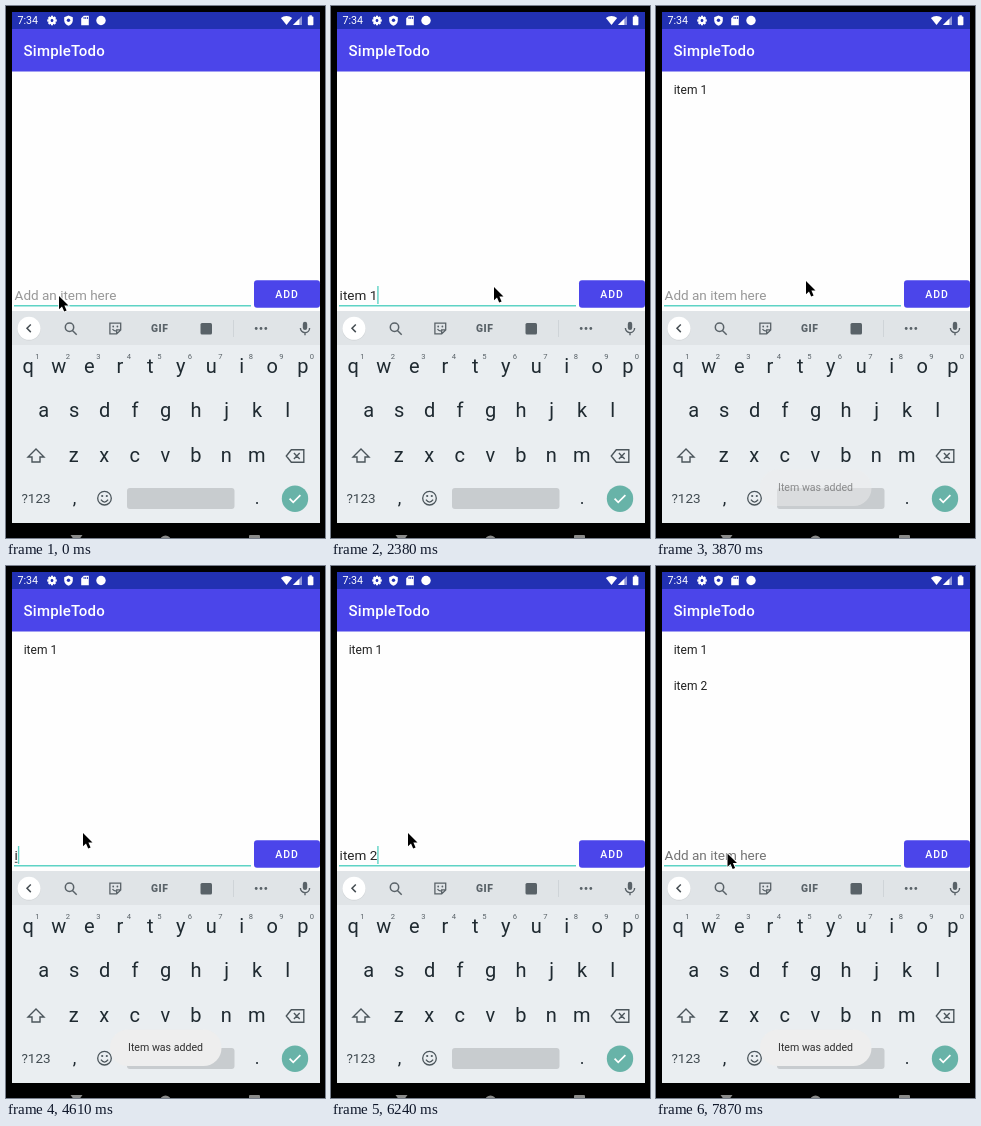
An HTML page with a canvas for the animation above (8000 ms loop, 319x532 px).

```html
<!DOCTYPE html>
<html lang="en">
<head>
<meta charset="utf-8">
<title>To-do list demo</title>
<style>
  html, body { margin: 0; width: 100%; height: 100%; overflow: hidden; background: #000; }
  canvas { display: block; width: 319px; height: 532px; }
</style>
</head>
<body>
<canvas id="stage"></canvas>
<script>
const W = 319, H = 532, LOOP = 8000, TICK = 148.5;
const cv = document.getElementById('stage');
const g = cv.getContext('2d');
const dpr = window.devicePixelRatio || 1;
cv.width = W * dpr;
cv.height = H * dpr;

const GREY = '#596268', INK = '#1f2a31', TEAL = '#5ed3c5', INDIGO = '#4b45ea';

// Drawing helpers
function rect(x, y, w, h, color, r = 0) {
  g.fillStyle = color;
  g.beginPath();
  g.roundRect(x, y, w, h, r);
  g.fill();
}
function dot(x, y, r, color) {
  g.fillStyle = color;
  g.beginPath();
  g.arc(x, y, r, 0, 7);
  g.fill();
}
function path(d, x, y, color, line = 0) {
  g.save();
  g.translate(x, y);
  const p = new Path2D(d);
  if (line) {
    g.strokeStyle = color;
    g.lineWidth = line;
    g.stroke(p);
  } else {
    g.fillStyle = color;
    g.fill(p);
  }
  g.restore();
}
function text(s, x, y, size, color, { weight = 400, align = 'left', gap = 0 } = {}) {
  g.font = `${weight} ${size}px Roboto, sans-serif`;
  g.letterSpacing = gap + 'px';
  g.textAlign = align;
  g.fillStyle = color;
  g.fillText(s, x, y);
}
// Latest value whose tick has been reached
function at(track, k) {
  let v = track[0][1];
  for (const [t, val] of track) if (k >= t) v = val;
  return v;
}
const within = (k, ...spans) => spans.some(([a, b]) => k >= a && k < b);
const clamp = v => Math.max(0, Math.min(1, v));

// Timeline, in ticks
const typed = [[0, ''], [2, 'i'], [4, 'it'], [5, 'ite'], [6, 'item'], [10, 'item '], [13, 'item 1'], [21, ''],
  [31, 'i'], [32, 'it'], [33, 'ite'], [34, 'item'], [37, 'item '], [41, 'item 2'], [48, '']];
const strip = [[0, 'tools'], [4, 'words'], [11, 'blank'], [14, 'tools'],
  [32, 'words'], [39, 'blank'], [42, 'tools']];
const mouse = [[0, [53, 290]], [16, [163, 281]], [17, [232, 287]], [18, [278, 291]], [19, [290, 292]],
  [25, [240, 286]], [26, [150, 275]], [27, [95, 268]], [28, [77, 267]],
  [44, [150, 275]], [45, [250, 288]], [46, [290, 292]], [50, [250, 290]],
  [51, [150, 288]], [52, [95, 288]], [53, [71.5, 287.5]]];

function statusBar() {
  rect(6, 6, 308, 17.5, '#2231b3');
  text('7:34', 11.5, 18.3, 10.7, '#fff');
  for (let i = 0; i < 8; i++) {
    g.save();
    g.translate(46, 14.5);
    g.rotate(i * Math.PI / 4);
    rect(-1.1, -4.8, 2.2, 3, '#fff');
    g.restore();
  }
  g.strokeStyle = '#fff';
  g.lineWidth = 2.2;
  g.beginPath();
  g.arc(46, 14.5, 2.6, 0, 7);
  g.stroke();
  path('M0-5L4.3-3.2V0C4.3 2.6 2.4 4.5 0 5.2C-2.4 4.5-4.3 2.6-4.3 0V-3.2Z', 62.5, 14.5, '#fff');
  dot(62.5, 14.3, 1.7, '#2231b3');
  path('M-1.2-4.8H3.8V4.8H-3.8V-2.2Z', 79, 14.5, '#fff');
  for (let i = 0; i < 3; i++) rect(77.6 + i * 1.7, 11, 0.9, 2, '#2231b3');
  dot(95, 14.5, 4.7, '#fff');
  path('M0 4.5L-5.6-2.4C-2.5-5.2 2.5-5.2 5.6-2.4Z', 280.5, 14.5, '#fff');
  path('M4.5-4.5V4.5H-4.5Z', 291.5, 14.5, '#8d94d8');
  path('M1.8-1.8V4.5H-4.5Z', 291.5, 14.5, '#fff');
  rect(301.8, 10.4, 5.6, 8.8, '#fff', 0.7);
  rect(303.3, 9.3, 2.6, 1.6, '#fff');
}

function entry(k) {
  const s = at(typed, k);
  rect(8, 299, 237, 1.6, TEAL);
  if (s) text(s, 8.6, 294, 13.5, '#262626');
  else text('Add an item here', 8.6, 294, 13.5, k >= 48 ? '#747474' : '#989898');
  g.font = '400 13.5px Roboto, sans-serif';
  const w = s ? g.measureText(s).width : 0;
  if (s && !s.includes(' ')) rect(8.8, 295.8, w - 0.6, 1, '#444');
  if (!within(k, [0, 2], [9, 10], [23, 24], [26, 31], [36, 37], [52, 54]))
    rect(8.6 + w, 280, 1.4, 18, TEAL);

  const pressed = within(k, [20, 23], [47, 49]);
  rect(248, 274.3, 66, 27.4, pressed ? '#6150ed' : INDIGO, 3);
  text('ADD', 269.2, 292, 10.5, '#fff', { weight: 500, gap: 0.94 });
}

function tools() {
  path('M2.2 2.2L6.2 6.2M3.2-1.2A4.2 4.2 0 1 1-5.2-1.2A4.2 4.2 0 1 1 3.2-1.2', 64.5, 322.5, GREY, 1.5);
  path('M-5.4-5.4H5.4V1.4L1.4 5.4H-5.4ZM1.4 5.4V1.4H5.4M-2.8.5Q-1.5 2.8 .6 2.2', 109.3, 322.5, GREY, 1.3);
  dot(107.2, 320.5, 0.9, GREY);
  dot(111.4, 320.5, 0.9, GREY);
  text('GIF', 145, 326.2, 10.3, GREY, { weight: 800, gap: 0.5 });
  rect(194.5, 317, 11.5, 11.5, GREY, 1.5);
  rect(227, 314, 1, 17, '#cfd4d8');
  for (let i = -1; i < 2; i++) dot(255 + i * 4.8, 322.5, 1.4, GREY);
}

function suggestions(words) {
  rect(113, 314, 1, 18, '#ccd1d5');
  rect(204, 314, 1, 18, '#ccd1d5');
  words.forEach((w, i) => text(w, 73.3 + i * 85.3, 327.5, 13.3, '#5d686f', { align: 'center' }));
}

function keyboard(k) {
  rect(6, 305, 308, 34, '#e0e4e7');
  rect(6, 339, 308, 178, '#eaeef1');
  const mode = at(strip, k);
  dot(23, 323, 11.8, '#d3d7da');
  dot(23, 322.3, 11.5, '#fff');
  path(mode === 'tools' ? 'M1.8-3.8L-2 0L1.8 3.8' : 'M-1.8-3.8L2 0L-1.8 3.8', 23, 322.3, '#454d52', 1.5);
  if (mode === 'tools') tools();
  else suggestions(mode === 'words' ? ['item', 'items', 'itemized'] : []);
  rect(296.8, 315.8, 4.4, 8.2, GREY, 2.2);
  path('M-4.6-.6A4.6 4.6 0 0 0 4.6-.6M0 4V6.6', 299, 322.6, GREY, 1.4);

  [['qwertyuiop', 22.3, 367], ['asdfghjkl', 37.6, 411.3], ['zxcvbnm', 67.8, 456]].forEach(([row, x, y]) => {
    [...row].forEach((c, i) => text(c, x + i * 30.5, y, 20, INK, { align: 'center' }));
  });
  [...'1234567890'].forEach((c, i) => text(c, 31.3 + i * 30.5, 352.5, 7.6, GREY, { align: 'center' }));

  path('M0-7L8 1H4V6H-4V1H-8Z', 30, 450, '#4b555b', 1.4);
  path('M-4-6.2H8.5V6.2H-4L-9 0ZM-1.4-2.9L4.4 2.9M4.4-2.9L-1.4 2.9', 289.3, 450, '#4b555b', 1.4);

  text('?123', 30, 497.2, 13.5, '#414b51', { align: 'center' });
  text(',', 68.5, 498, 18, INK, { align: 'center' });
  path('M6.8 0A6.8 6.8 0 1 1-6.8 0A6.8 6.8 0 1 1 6.8 0M-3.6 1.5Q0 6.2 3.6 1.5', 98.5, 492.2, '#4b555b', 1.3);
  dot(96.2, 490, 1.1, '#4b555b');
  dot(100.8, 490, 1.1, '#4b555b');
  rect(121, 482, 107.5, 21, '#c8cccf', 3);
  text('.', 251, 498, 18, INK, { align: 'center' });
  dot(289, 492.7, 13.2, '#68b3a8');
  path('M-5.4 0L-1.8 3.6L5.4-3.6', 289, 492.7, '#fff', 1.7);
}

function toast(k) {
  const a = k < 40 ? Math.min(clamp((k - 24) / 4), clamp((39 - k) / 4)) : clamp((k - 49) / 4);
  if (!a) return;
  g.globalAlpha = a;
  rect(104, 463.5, 111.5, 36.5, '#eeeeee', 18);
  text('Item was added', 159.5, 485.3, 10.6, '#303030', { align: 'center' });
  g.globalAlpha = 1;
}

function cursor(k) {
  const [x, y] = at(mouse, k);
  const d = 'M0 0V13.2L3 10.4L5.2 15.4L7.6 14.4L5.4 9.6H9.5Z';
  path(d, x, y, '#fff', 1.6);
  path(d, x, y, '#000');
}

function draw(k) {
  g.setTransform(dpr, 0, 0, dpr, 0, 0);
  rect(0, 0, W, H, '#000');
  rect(6, 65, 308, 240, '#fefefe');
  statusBar();
  rect(6, 23, 308, 42.5, INDIGO);
  text('SimpleTodo', 17.6, 50, 15, '#fff', { weight: 500, gap: 0.19 });
  if (k >= 24) text('item 1', 17.7, 88, 12, '#222');
  if (k >= 49) text('item 2', 17.7, 124, 12, '#222');
  entry(k);
  keyboard(k);
  toast(k);
  path('M-6 0H6L0 8Z', 70.5, 529, '#8a8a8a');
  dot(159.5, 535, 5.5, '#8a8a8a');
  rect(243, 529, 11, 11, '#8a8a8a', 1);
  cursor(k);
}

const start = performance.now();
function frame() {
  const t = (performance.now() - start) % LOOP;
  draw(Math.min(53, Math.floor((t + 8) / TICK)));
  requestAnimationFrame(frame);
}
frame();
</script>
</body>
</html>
```
